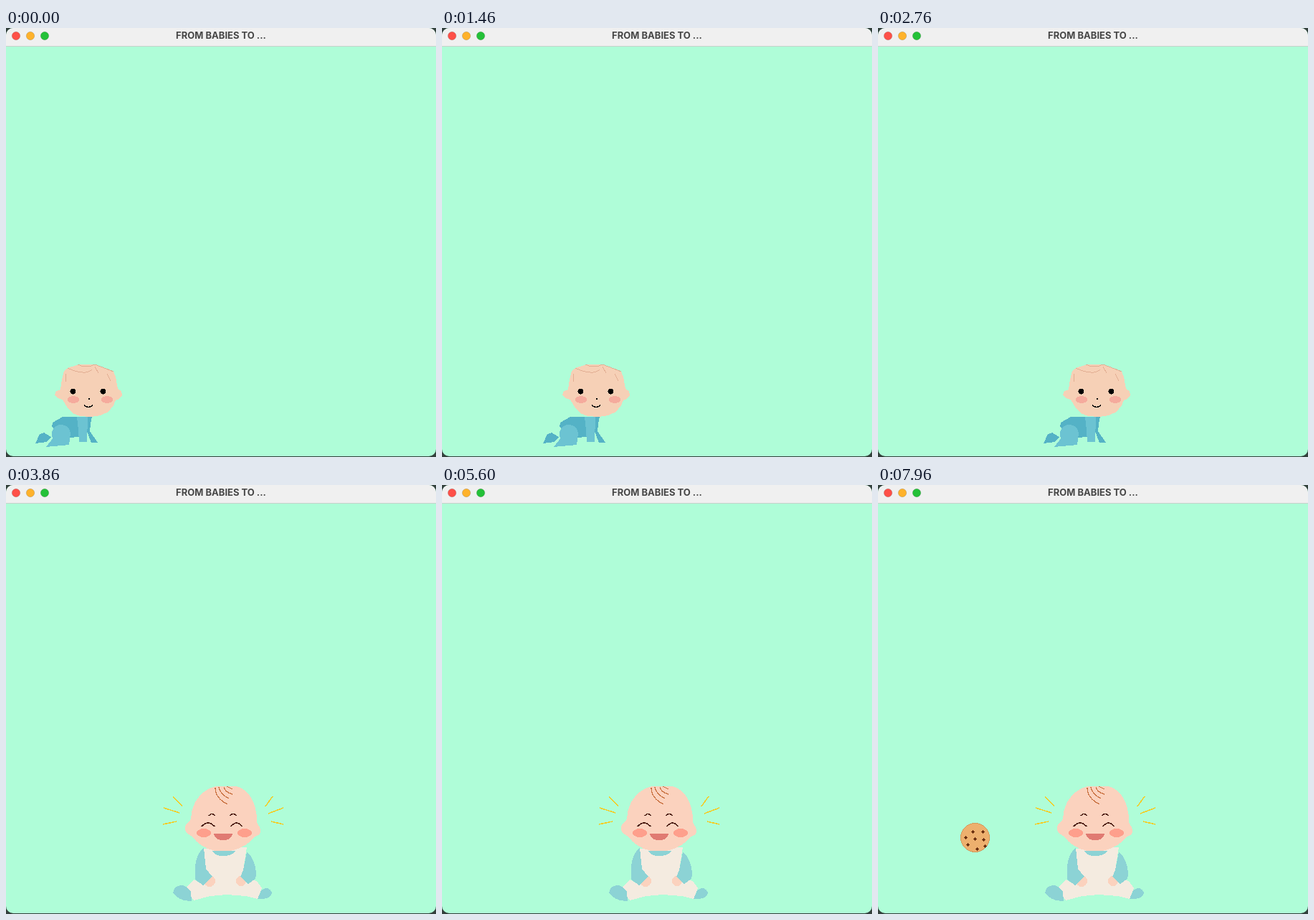
Animation of 600x598 px, one loop 8000 ms. Source, as an HTML page:

```html
<!DOCTYPE html>
<html lang="en">
<head>
<meta charset="utf-8">
<title>Babies</title>
<style>
  html, body { margin: 0; width: 100%; height: 100%; overflow: hidden; background: #33403c; }
  svg { display: block; width: 100vw; height: 100vh; }
  text { font: 700 13px Inter, sans-serif; fill: #464646; text-anchor: middle; }
  .sprite { shape-rendering: crispEdges; }
  .line { fill: none; }
  .skin { fill: #fbd2be; }
  .sleeve { fill: #8cd3d5; }
  .dark { fill: #54b2c6; }
  .light { fill: #6cc3d2; }
</style>
</head>
<body>
<svg viewBox="0 0 600 598">
  <defs>
    <clipPath id="window"><rect width="600" height="597" rx="10"/></clipPath>
    <path id="head" d="M293 420C275 424 259 440 258 465C257 470 252 470 250 476C249 484 254 487 260 490C268 502 283 511 303 511C322 511 340 501 347 490C353 489 356 486 355 480C354 474 350 474 350 468C350 445 340 425 322 420Z"/>
    <clipPath id="face"><use href="#head"/></clipPath>
    <path id="chips" fill="#6b3010" d=""/>
  </defs>

  <g clip-path="url(#window)">
    <rect width="600" height="598" fill="#affdd8"/>
    <rect width="600" height="25" fill="#f0f0f0"/>
    <rect y="25" width="600" height="1" fill="#c5d2cb"/>
    <g stroke-opacity=".15" stroke="#000">
      <circle cx="14" cy="11" r="5.7" fill="#ff5048"/>
      <circle cx="34" cy="11" r="5.7" fill="#ffb22b"/>
      <circle cx="54" cy="11" r="5.7" fill="#24c138"/>
    </g>
    <text x="300" y="15.3">FROM BABIES TO ...</text>

    <g id="crawler" class="sprite">
      <path class="dark" d="M79 542H120L118 552 117 562 128 578H119L112 560 101 570 88 571 64 556 65 550ZM41 579L47 566 53 564 63 570 57 577Z"/>
      <circle class="light" cx="77" cy="566" r="13"/>
      <path class="light" d="M56 584L66 571 90 564 88 581ZM99 542H114L113 577H102L101 560Z"/>
      <path fill="#f6d0b6" d="M81 478L88 473 103 469H125L150 479 153 486 156 503 161 506 162 512 158 517 153 519 150 526 143 535 132 540 118 542 103 541 93 537 85 528 79 518 72 516 68 511 70 506 76 504 78 490Z"/>
      <path class="line" stroke="#e2ae93" d="M83 482L84 493M86 474Q101 481 111 480Q117 479 120 476M100 469Q112 475 124 469L140 475 150 479M124 472L129 481M141 482L146 492"/>
      <g fill="#f5ab9d"><ellipse cx="94" cy="518" rx="8" ry="5"/><ellipse cx="141" cy="518" rx="8" ry="5"/></g>
      <circle cx="93.5" cy="506.5" r="4"/><circle cx="135.5" cy="506.5" r="4"/>
      <rect x="115" y="516" width="2" height="2"/>
      <path class="line" stroke="#000" stroke-width="1.5" d="M109 526Q115 531 121 526"/>
    </g>

    <g id="sitter" class="sprite">
      <path class="line" stroke="#f5cb20" stroke-width="1.5" d="M233 435L246 447M220 450L242 457M219 473L238 469M372 434L362 448M387 450L366 458M370 469L387 473"/>
      <path fill="#f4ebe0" d="M274 507L336 505 332 530 330 545 337 549 350 552 357 562 351 577 335 573 308 571 285 573 262 579 250 563 262 550 273 556 278 545Z"/>
      <circle class="skin" cx="284" cy="552" r="8"/><circle class="skin" cx="328" cy="552" r="7"/>
      <path class="sleeve" d="M276 506C266 512 262 530 264 550L275 558 288 546 279 535ZM336 511C346 520 351 535 348 549L338 556 327 546 331 537ZM236 561Q248 553 258 567L259 580Q240 580 233 568ZM351 577L356 565Q366 558 371 568Q370 578 351 577Z"/>
      <use href="#head" class="skin"/>
      <path class="sleeve" d="M288 510H320Q316 517 303 517Q291 517 288 510Z"/>
      <path class="line" stroke="#c8703f" stroke-width="1.3" d="M292 422c0 10 7 18 17 23M297 421c1 7 6 12 14 16M304 421c1 4 4 8 12 10M308 420l8 4"/>
      <path class="line" stroke="#4a1b10" stroke-width="1.5" d="M283 461Q287 456 292 461M312 461Q317 456 322 461"/>
      <g fill="#fe9f8c"><ellipse cx="276" cy="485" rx="10" ry="6"/><ellipse cx="333" cy="485" rx="10" ry="6"/></g>
      <path fill="#e07a72" d="M290 486H316Q315 495 303 495Q291 495 290 486Z"/>
      <path id="laughing" class="line" stroke="#4a1b10" stroke-width="1.5" d="M273 476Q282 466 291 476M314 476Q322 466 329 476"/>
      <g id="staring">
        <g fill="#fff" stroke="#4a1b10"><circle cx="284" cy="471.5" r="7.5"/><circle cx="321.5" cy="473" r="7.5"/></g>
        <g fill="#704a2c"><circle cx="286" cy="472" r="5.5"/><circle cx="320" cy="474.5" r="5.5"/></g>
        <g fill="#fff"><circle cx="288" cy="470" r="1.3"/><circle cx="319" cy="475" r="1.3"/></g>
      </g>
      <g id="bite">
        <circle cx="279.5" cy="491.5" r="20" fill="#edb06e" fill-opacity=".87" clip-path="url(#face)"/>
        <circle cx="279.5" cy="491.5" r="20" class="line" stroke="#b7a968"/>
        <use href="#chips" x="279.5" y="491.5"/>
      </g>
    </g>

    <g id="cookie" class="sprite">
      <circle cy="491.5" r="20" fill="#edb06e" stroke="#d2995c"/>
      <use href="#chips" y="491.5"/>
    </g>
  </g>
</svg>
<script>
const LOOP = 8000, TICK = 28.6;
const CRAWL_START = 31, SIT_AT = 2890;
const COOKIE_STARTS = [5610, 7690], COOKIE_TICKS = 45;

const byId = id => document.getElementById(id);
const show = (id, visible) => { byId(id).style.display = visible ? '' : 'none'; };
const place = (id, x) => byId(id).setAttribute('transform', `translate(${x} 0)`);
const ticksSince = (start, t) => Math.max(0, Math.floor((t - start) / TICK));

const chipCenters = [[-3, -8], [11, -8], [-13, 0], [0, 2], [12, 3], [-10, 10], [14, 12], [3, 16]];
byId('chips').setAttribute('d',
  chipCenters.map(([x, y]) => `M${x - 2.5} ${y}l2.5-2.5 2.5 2.5-2.5 2.5z`).join(''));

function draw(t) {
  const sitting = t >= SIT_AT;
  show('crawler', !sitting);
  show('sitter', sitting);
  place('crawler', 2 * ticksSince(CRAWL_START, t));

  const start = COOKIE_STARTS.filter(s => s <= t).pop();
  const served = start !== undefined;
  const steps = served ? ticksSince(start, t) : 0;
  const eating = served && steps >= COOKIE_TICKS;
  show('cookie', served && !eating);
  place('cookie', 99.5 + 4 * steps);
  show('bite', eating);
  show('staring', eating);
  show('laughing', !eating);
}

const begin = performance.now();
function frame() {
  draw((performance.now() - begin) % LOOP);
  requestAnimationFrame(frame);
}
frame();
</script>
</body>
</html>
```
